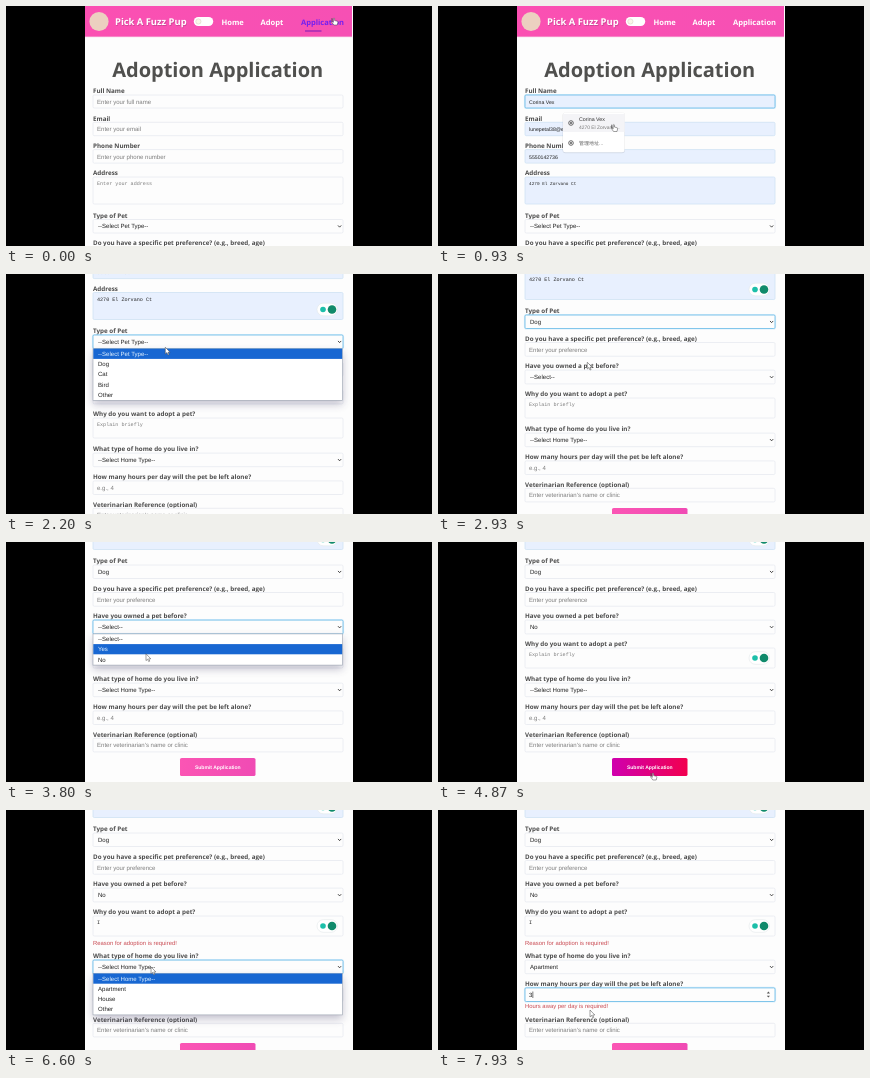
An HTML page that plays this animation: 426 by 240 pixels, repeating every 8 s.

```html
<!DOCTYPE html>
<html lang="en">
<head>
<meta charset="utf-8">
<title>Adoption Application</title>
<style>
  html, body { margin: 0; width: 100%; height: 100%; overflow: hidden; background: #000; }
  svg { display: block; width: 100vw; height: 100vh; }
  text { text-rendering: geometricPrecision; font-family: "Liberation Sans", Arial, sans-serif; white-space: pre; }
  .bold { font-family: "Open Sans", "Noto Sans", sans-serif; font-weight: 700; }
  .mono { font-family: "Liberation Mono", monospace; }
  .cjk { font-family: "Noto Sans CJK SC", "Noto Sans CJK", sans-serif; }
</style>
</head>
<body>
<script>
const LOOP = 8000;
const INK = '#222', HINT = '#7d7d7d', LABEL = '#4b4b4b', PAPER = '#fdfdfd';
const FILLED = '#e8f0fe', FOCUS = '#62b8e6', EDGE = '#e8eaf0';
const PREVIEW_FROM = 870, PREVIEW_TO = 1130;

function el(tag, attrs, parent) {
  const node = document.createElementNS('http://www.w3.org/2000/svg', tag);
  for (const key in attrs) node.setAttribute(key, attrs[key]);
  if (parent) parent.append(node);
  return node;
}
const group = (parent, attrs = {}) => el('g', attrs, parent);
const rect = (parent, x, y, width, height, fill, extra) =>
  el('rect', { x, y, width, height, fill, ...extra }, parent);
const circle = (parent, cx, cy, r, fill, extra) => el('circle', { cx, cy, r, fill, ...extra }, parent);

// Text is placed by the middle of its capitals.
function text(parent, string, x, middle, size, fill, extra) {
  const node = el('text', { x, y: middle + size * 0.36, fill, style: `font-size:${size}px`, ...extra }, parent);
  node.textContent = string;
  return node;
}
function show(node, on) { node.setAttribute('visibility', on ? 'visible' : 'hidden'); }
function shift(node, x, y) { node.setAttribute('transform', `translate(${x} ${y})`); }

const svg = el('svg', { viewBox: '0 0 426 240', preserveAspectRatio: 'none' }, document.body);
const defs = el('defs', {}, svg);
rect(el('clipPath', { id: 'panel' }, defs), 79, 0, 268, 240);
const blur = el('filter', { id: 'blur', x: '-20%', y: '-60%', width: '140%', height: '220%' }, defs);
el('feGaussianBlur', { stdDeviation: 4 }, blur);

function gradient(id, ...colours) {
  const node = el('linearGradient', { id }, defs);
  colours.forEach((c, i) => el('stop', { offset: i / (colours.length - 1), 'stop-color': c }, node));
}
gradient('rest', '#fb55b4', '#f04bb4');
gradient('hover', '#cf00ae', '#f2004f');
gradient('bar', '#fb50b2', '#f650b4');

rect(svg, 0, 0, 426, 240, '#000');
const panel = group(svg, { 'clip-path': 'url(#panel)' });
rect(panel, 79, 0, 268, 240, PAPER);
const page = group(panel);

// Header
rect(page, 79, 0, 267, 31.3, '#f3d6e6');
rect(page, 79, 0, 267, 30.6, 'url(#bar)');
circle(page, 93, 15.5, 9.6, '#ecd0c0');
text(page, 'Pick A Fuzz Pup', 109.6, 16.4, 9.4, '#a83a7c', { class: 'bold', opacity: 0.5 });
text(page, 'Pick A Fuzz Pup', 109, 15.8, 9.4, '#fff', { class: 'bold' });
rect(page, 187.8, 11, 19.4, 9, '#fff', { rx: 4.5 });
circle(page, 192.4, 15.5, 2.6, '#fbf6ea', { stroke: '#dfd8cc', 'stroke-width': 0.7 });
const [, , navLink] = [['Home', 215.5], ['Adopt', 254.5], ['Application', 295]].map(([name, x]) =>
  text(page, name, x, 15.8, 7.55, '#fff', { class: 'bold' }));
const navLine = rect(page, 299, 24.5, 16.5, 1, '#7a1bb8');

text(page, 'Adoption Application', 211.7, 63.8, 20, '#50504e', { class: 'bold', 'text-anchor': 'middle' });

// Form: the lower groups slide down when error lines appear.
const afterReason = group(page), afterHours = group(page);
const fields = {};

function field(key, parent, title, labelY, top, height, hint, kind = 'input') {
  const node = group(parent);
  text(node, title, 87, labelY, 6.25, LABEL, { class: 'bold' });
  const glow = rect(node, 86.5, top - 0.5, 251, height + 1, 'none',
    { rx: 2, stroke: '#9fd3f5', 'stroke-width': 1.2, opacity: 0.35 });
  const box = rect(node, 87, top, 250, height, PAPER, { rx: 1.2, 'stroke-width': 0.8 });
  const area = kind === 'area', select = kind === 'select';
  const size = area ? 5.1 : 6.05, middle = top + (area ? 6.4 : height / 2);
  const value = text(node, hint, select ? 92 : 91, middle, size, HINT, area ? { class: 'mono' } : {});
  if (select) {
    el('path', { d: `M332 ${middle - 0.8}l1.6 1.7l1.6-1.7`, fill: 'none', stroke: '#333', 'stroke-width': 0.9 }, node);
  }
  fields[key] = { box, glow, value, hint, select, size };
}

field('name', page, 'Full Name', 85, 89, 13, 'Enter your full name');
field('email', page, 'Email', 112.3, 116.3, 13.4, 'Enter your email');
field('phone', page, 'Phone Number', 139.7, 143.6, 13.5, 'Enter your phone number');
field('address', page, 'Address', 167, 171, 27, 'Enter your address', 'area');
field('pet', page, 'Type of Pet', 209.6, 213.5, 13.5, '--Select Pet Type--', 'select');
field('wish', page, 'Do you have a specific pet preference? (e.g., breed, age)', 237.2, 241, 13.7, 'Enter your preference');
field('owned', page, 'Have you owned a pet before?', 264.6, 268.6, 13.8, '--Select--', 'select');
field('reason', page, 'Why do you want to adopt a pet?', 292.3, 296.5, 20, 'Explain briefly', 'area');
field('home', afterReason, 'What type of home do you live in?', 327.6, 331.6, 13.6, '--Select Home Type--', 'select');
field('hours', afterReason, 'How many hours per day will the pet be left alone?', 355.4, 359.4, 13.6, 'e.g., 4');
field('vet', afterHours, 'Veterinarian Reference (optional)', 382.8, 386.8, 13.6, "Enter veterinarian's name or clinic");

const button = rect(afterHours, 174, 406.5, 75.5, 18, 'url(#rest)', { rx: 1.6 });
text(afterHours, 'Submit Application', 211.8, 415.5, 5.05, '#fff', { 'font-weight': 700, 'text-anchor': 'middle' });

const errors = group(page);
text(errors, 'Reason for adoption is required!', 87, 322.9, 5.9, '#c94a52');
text(errors, 'Hours away per day is required!', 87, 386.5, 5.9, '#c94a52');

const spinner = el('path', { d: 'M328.8 374l1.6-1.9l1.6 1.9zM328.8 376.2l1.6 1.9l1.6-1.9z', fill: '#555' }, page);
const caret = rect(page, 0, 0, 0.6, 6.5, '#222');

function helper(y) {
  const node = group(page);
  rect(node, 311, y - 6.3, 20.5, 12.6, '#fff', { rx: 6.3, stroke: '#e3e8ea', 'stroke-width': 0.6 });
  circle(node, 317, y, 2.8, '#1cbfa9');
  circle(node, 326, y, 4.3, '#108a6b');
  return node;
}
const addressHelper = helper(188), reasonHelper = helper(306.5);

// Open lists
const ROW = 10.2;
function menu(top, options) {
  const node = group(page), height = options.length * ROW + 0.6;
  rect(node, 87, top + 4, 249.5, height, '#3a3560', { opacity: 0.3, filter: 'url(#blur)' });
  rect(node, 87, top, 249.5, height, '#fff', { stroke: '#9aa2b0', 'stroke-width': 0.6 });
  const bar = rect(node, 87.3, top, 248.9, ROW, '#1867d2');
  const rows = options.map((name, i) => text(node, name, 92, top + ROW * (i + 0.5), 6.05, INK));
  return (open, active) => {
    show(node, open);
    bar.setAttribute('y', top + ROW * active);
    rows.forEach((row, i) => row.setAttribute('fill', i === active ? '#e6f4ff' : INK));
  };
}
const petMenu = menu(227.2, ['--Select Pet Type--', 'Dog', 'Cat', 'Bird', 'Other']);
const ownedMenu = menu(282.4, ['--Select--', 'Yes', 'No']);
const homeMenu = menu(354, ['--Select Home Type--', 'Apartment', 'House', 'Other']);

// Autofill popup
const popup = group(page);
rect(popup, 124.5, 106.5, 62.5, 40.8, '#000', { opacity: 0.09, rx: 3 });
rect(popup, 125, 106.5, 61.5, 39.8, '#fff', { rx: 2.5 });
const popupRow = rect(popup, 125, 108, 61.5, 18, '#f4f4f7');
for (const y of [117, 137]) {
  circle(popup, 133, y, 2.3, 'none', { stroke: '#444', 'stroke-width': 0.8 });
  circle(popup, 133, y, 0.9, '#444');
}
text(popup, 'Corina Vex', 141, 113, 5.3, '#333');
text(popup, '4270 El Zorvano…', 141, 121, 4.9, '#777');
text(popup, '管理地址...', 141, 137, 5, '#666', { class: 'cjk' });

// Pointers
const pointerStyle = { fill: '#fff', stroke: '#444', 'stroke-width': 0.5, 'stroke-linejoin': 'round' };
const pointers = {
  arrow: el('path', { d: 'M0 0V6.8L1.6 5.4L2.7 7.8L3.8 7.3L2.7 5H4.8Z', ...pointerStyle }, panel),
  hand: el('path', { d: 'M-.6 .4Q0-.5 .6 .4V2.5L3.4 3.3Q4 3.5 3.8 4.4L3.2 7H-.2L-2.2 4.2Q-2-3.4-2 3.5L-.6 4.3Z', ...pointerStyle }, panel),
  beam: el('path', { d: 'M-1.2-3Q0-3 0-2.4Q0-3 1.2-3M0-2.4V2.4M-1.2 3Q0 3 0 2.4Q0 3 1.2 3', fill: 'none', stroke: '#444', 'stroke-width': 0.6 }, panel),
};

// [time, x, y, pointer]
const path = [
  [0, 328, 12, 'hand'], [130, 328, 12, 'arrow'], [480, 165, 96, 'beam'], [680, 165, 96, 'beam'],
  [900, 175.8, 118.5, 'hand'], [1150, 175.8, 118.5, 'beam'], [1750, 165, 68, 'arrow'], [2000, 160, 70, 'arrow'],
  [2200, 159.3, 73.2, 'arrow'], [2480, 150, 90, 'arrow'], [2750, 150, 90, 'arrow'], [3200, 148, 85, 'arrow'],
  [3550, 144, 86, 'arrow'], [3800, 140, 111.8, 'arrow'], [4000, 139, 117, 'arrow'], [4200, 139, 117, 'arrow'],
  [4650, 215, 231, 'hand'], [5100, 215, 231, 'hand'], [5200, 205, 215, 'arrow'], [5500, 145, 116, 'beam'],
  [6000, 145, 116, 'arrow'], [6300, 146, 156, 'arrow'], [6650, 145, 157, 'arrow'], [6900, 142, 178, 'arrow'],
  [7100, 142, 178, 'arrow'], [7380, 150, 184, 'beam'], [7600, 150, 184, 'arrow'], [7850, 152, 200, 'arrow'], [8000, 152, 200, 'arrow'],
];
const scrolls = [[0, 0], [1250, 0], [1750, 152.5], [2750, 152.5], [3100, 190.5], [8000, 190.5]];
const focusSteps = [[0, ''], [580, 'name'], [1950, 'pet'], [3350, 'owned'], [4650, ''], [5550, 'reason'], [6350, 'home'], [7420, 'hours']];
// [time, field, text]
const entries = [
  [PREVIEW_FROM, 'name', 'Corina Vex'], [PREVIEW_FROM, 'email', 'lunepetal38@example.com'],
  [PREVIEW_FROM, 'phone', '5550142736'], [PREVIEW_FROM, 'address', '4270 El Zorvano Ct'],
  [2650, 'pet', 'Dog'], [4130, 'owned', 'No'],
  [5800, 'reason', 'I'], [7030, 'home', 'Apartment'], [7750, 'hours', '3'],
];

function tween(table, t, column) {
  const i = Math.max(0, table.findLastIndex(row => row[0] <= t));
  const a = table[i], b = table[i + 1] || a;
  const k = b === a ? 0 : (t - a[0]) / (b[0] - a[0]);
  return a[column] + (b[column] - a[column]) * k * k * (3 - 2 * k);
}
const step = (table, t, column = 1) => table.findLast(row => row[0] <= t)[column];
const between = (t, from, to) => t >= from && t < to;

function render(t) {
  shift(page, 0, -tween(scrolls, t, 1));
  const invalid = t >= 5030;
  shift(afterReason, 0, invalid ? 9 : 0);
  shift(afterHours, 0, invalid ? 17 : 0);
  show(errors, invalid);

  const onLink = t < 200;
  navLink.setAttribute('fill', onLink ? '#7420f0' : '#fff');
  show(navLine, onLink);

  const focus = step(focusSteps, t);
  const preview = between(t, PREVIEW_FROM, PREVIEW_TO);
  for (const key in fields) {
    const { box, glow, value, hint, select, size } = fields[key];
    const entry = entries.find(e => e[1] === key && e[0] <= t);
    const autofill = entry && entry[0] === PREVIEW_FROM;
    value.textContent = entry ? entry[2] : hint;
    value.setAttribute('fill', entry || select ? INK : HINT);
    // Suggested values are shown in smaller type until accepted.
    value.style.fontSize = `${autofill && preview ? size * 0.86 : size}px`;
    box.setAttribute('fill', autofill ? FILLED : PAPER);
    box.setAttribute('stroke', key === focus ? FOCUS : autofill ? '#d0e3f4' : EDGE);
    show(glow, key === focus);
  }

  show(popup, between(t, 600, PREVIEW_TO));
  show(popupRow, between(t, 830, PREVIEW_TO));
  show(addressHelper, t >= 1600);
  show(reasonHelper, t >= 4300);
  petMenu(between(t, 2050, 2650), t < 2420 ? 0 : 1);
  ownedMenu(between(t, 3480, 4130), t < 3720 ? 0 : t < 3920 ? 1 : 2);
  homeMenu(between(t, 6430, 7030), t < 6780 ? 0 : 1);
  button.setAttribute('fill', between(t, 4600, 5190) ? 'url(#hover)' : 'url(#rest)');
  show(spinner, focus === 'hours');

  const carets = { name: [91, 92.2], reason: [t < 5800 ? 91 : 94.2, 299.6], hours: [t < 7750 ? 91 : 94.6, 372] };
  const spot = carets[focus];
  show(caret, spot && !between(t, PREVIEW_FROM, 1950) && (t >= 7750 || t % 1000 < 500));
  if (spot) {
    caret.setAttribute('x', spot[0]);
    caret.setAttribute('y', spot[1]);
  }

  const kind = step(path, t, 3);
  for (const name in pointers) show(pointers[name], name === kind);
  shift(pointers[kind], tween(path, t, 1), tween(path, t, 2));
}

const start = performance.now();
function tick() {
  render((performance.now() - start) % LOOP);
  requestAnimationFrame(tick);
}
tick();
</script>
</body>
</html>
```
